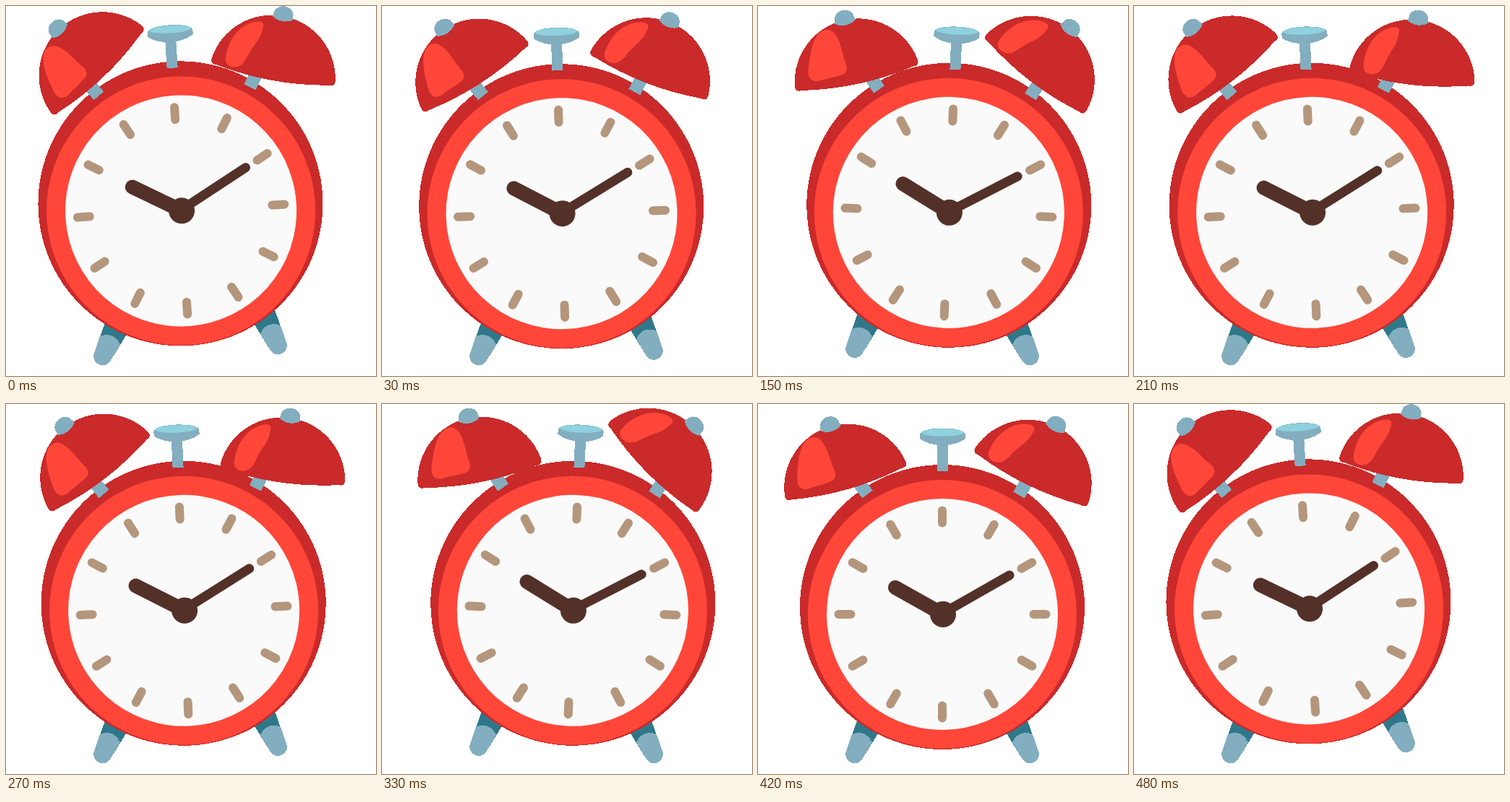
Write an HTML page that moves like this. It is 512 px wide and 512 px high and loops after 0.51 s.

```html
<!DOCTYPE html>
<html lang="en">
<head>
<meta charset="utf-8">
<title>Ringing alarm clock</title>
<style>
  html, body { margin: 0; width: 100%; height: 100%; overflow: hidden; background: #fff; }
  svg { display: block; width: 100vw; height: 100vh; }
  .dark { fill: #ca2a2a; }
  .bright { fill: #ff4639; }
  .steel { fill: #82aec0; }
  .teal { fill: #2f7889; }
  .dark, .steel, .teal { shape-rendering: crispEdges; }
  .hand { fill: none; stroke: #543128; stroke-linecap: round; }
  #ticks { stroke: #b4967c; stroke-width: 12; stroke-linecap: round; }
</style>
</head>
<body>
<svg viewBox="0 0 512 512">
  <defs>
    <g id="foot">
      <path class="teal" d="M142 424L121.500 482.500A12.500 12.500 0 0 0 144.500 491L182 430Z"/>
      <path class="steel" d="M130 457L121.500 482A12.500 12.500 0 0 0 144.500 491L158 468Q149 450 130 457Z"/>
    </g>
    <rect id="stem" class="steel" x="-9" y="-32" width="18" height="32"/>
    <path id="dome" class="dark" d="M-87 80A88 88 0 0 1 87 80Q88 89 79 88Q0 103 -79 88Q-88 89 -87 80Z"/>
    <path id="knob" class="steel" d="M-14.500 8L-13.500 3A13.500 11.500 0 0 1 13.500 3L14.500 8Q0 17 -14.500 8Z"/>
  </defs>

  <g id="leftFoot"><use href="#foot"/></g>
  <g id="rightFoot"><use href="#foot" transform="translate(510) scale(-1 1)"/></g>

  <g id="clock">
    <circle class="dark" cx="255" cy="281" r="197"/>
    <circle class="bright" cx="255" cy="291" r="186"/>
    <circle fill="#fafafa" cx="255" cy="291" r="160"/>
    <g id="ticks"></g>
    <path class="hand" stroke-width="20" d="M256 291L190 254"/>
    <path class="hand" stroke-width="13" d="M255 290L348 237"/>
    <circle fill="#543128" cx="256" cy="291" r="18"/>

    <path class="steel" d="M248 50H263V93H248Z"/>
    <path class="steel" d="M224 42V48Q236 57 255.500 57Q275 57 287 48V42Q285 34 255.500 33.500Q226 34 224 42Z"/>
    <ellipse fill="#8fd1de" cx="255.500" cy="39.500" rx="29" ry="5.200"/>

    <use href="#stem" transform="translate(151.500 125) rotate(-37)"/>
    <use href="#stem" transform="translate(361 126) rotate(30)"/>

    <g id="leftBell">
      <use href="#dome"/>
      <path class="bright" d="M-65 66C-60 50 -49 13 -30 13C-20 13 -16 21 -14 32C-12 44 -13 56 -11 67Q-11 77 -19 78.500C-31 80 -42 79 -53 80Q-66 80 -65 66Z"/>
      <use href="#knob"/>
    </g>
    <g id="rightBell">
      <use href="#dome"/>
      <path class="bright" d="M-68 78C-70 52 -58 28 -37 20Q-22 15 -25 28C-25 43 -33 50 -39 69C-42 80 -47 87 -58 87Q-67 86 -68 78Z"/>
      <use href="#knob"/>
    </g>
  </g>
</svg>
<script>
const STEP = 30, STEPS = 17;

// Extremes and mid-swings; the steps between are eased
const poses = [
  { step: 0, sway: -1, left: -40, right: 14 },
  { step: 2, sway: 0, left: -22, right: 32 },
  { step: 4, sway: 1, left: -10, right: 41 },
  { step: 8, sway: -1, left: -40, right: 3 },
  { step: 12, sway: 1, left: -9, right: 50 },
  { step: 14, sway: 0, left: -16, right: 26 },
  { step: 16, sway: -1, left: -40, right: 14 },
];

const byId = id => document.getElementById(id);
const place = (id, transform) => byId(id).setAttribute('transform', transform);
const smooth = p => p * p * (3 - 2 * p);

function poseAt(step) {
  const next = Math.max(1, poses.findIndex(pose => pose.step >= step));
  const from = poses[next - 1], to = poses[next];
  const p = smooth((step - from.step) / (to.step - from.step));
  const mix = part => from[part] + (to[part] - from[part]) * p;
  return { sway: mix('sway'), left: mix('left'), right: mix('right') };
}

byId('ticks').innerHTML = Array.from({ length: 12 }, (_, i) =>
  `<path d="M255 147.500V164.500" transform="rotate(${i * 30} 255 291)"/>`).join('');

function draw(now) {
  const { sway, left, right } = poseAt(Math.floor(now / STEP) % STEPS);
  place('clock', `translate(${12.9 * sway} ${-7.6 * Math.abs(sway)}) rotate(${3.6 * sway} 255 291)`);
  place('leftBell', `translate(98.5 26) rotate(${left})`);
  place('rightBell', `translate(414.5 26) rotate(${right})`);
  place('leftFoot', `translate(0 ${-15 * Math.max(0, sway)})`);
  place('rightFoot', `translate(0 ${-15 * Math.max(0, -sway)})`);
}

const start = performance.now();
function tick() {
  draw(performance.now() - start);
  requestAnimationFrame(tick);
}
tick();
</script>
</body>
</html>
```
